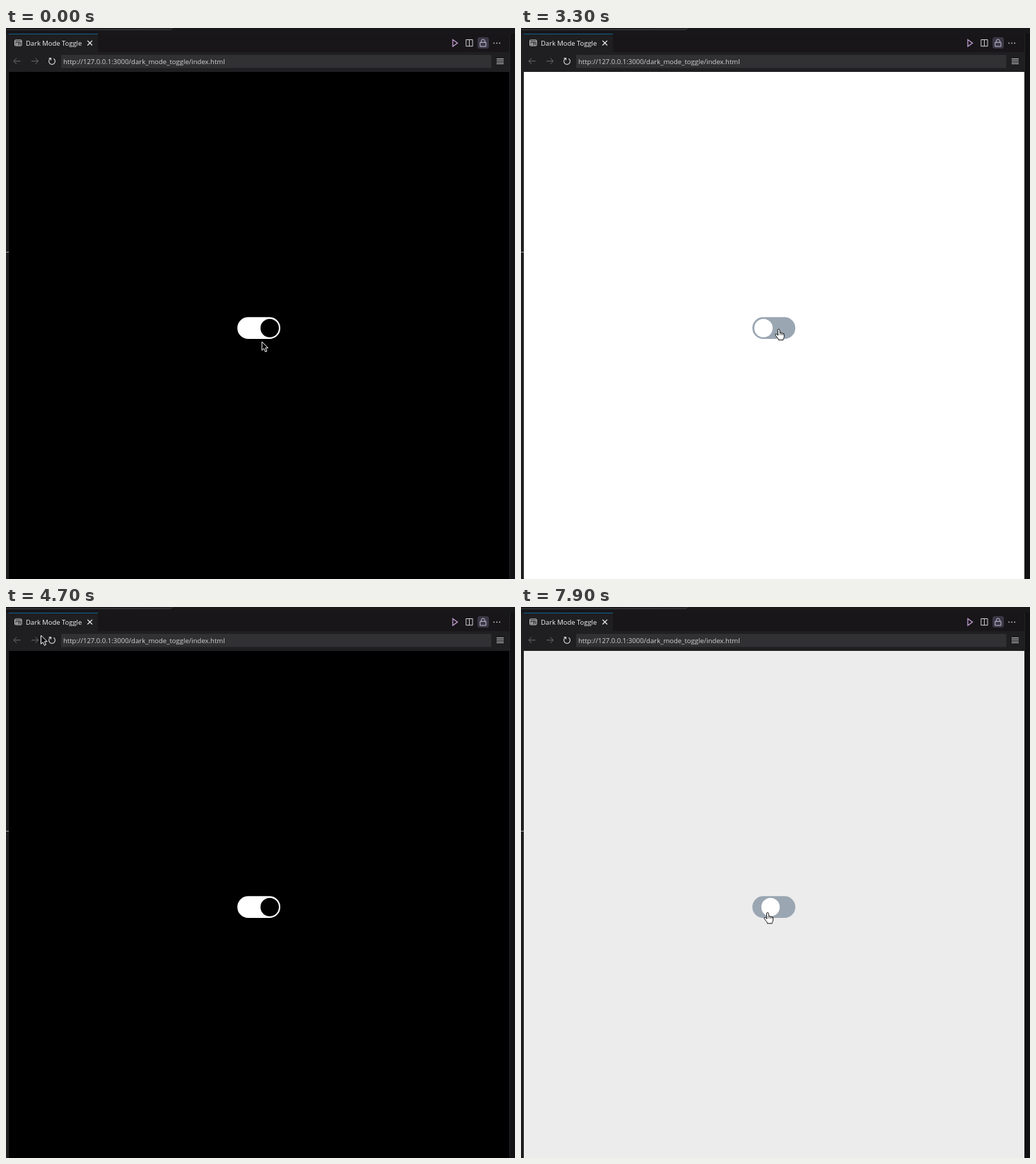
These frames come from a looping animation (720 by 778 pixels, 8000 ms). An HTML page:

```html
<!DOCTYPE html>
<html lang="en">
<head>
<meta charset="utf-8">
<title>Dark Mode Toggle</title>
<style>
  html, body { margin: 0; width: 100%; height: 100%; overflow: hidden; background: #1f1e20; }
  svg { display: block; width: 720px; height: 778px; }
  text { font-family: "Open Sans", "Noto Sans", sans-serif; }
  .line { fill: none; stroke: #d0cfd1; stroke-width: 1; }
  .dim { stroke: #6c6a6e; }
</style>
</head>
<body>
<svg viewBox="0 0 720 778">
  <!-- window frame -->
  <rect width="720" height="778" fill="#1f1e20"/>
  <rect width="720" height="8" fill="#18171a"/>
  <path d="M0 2.5H232Q235 2.5 235 0" fill="#222124" stroke="#3c3b3e"/>
  <rect x="4" y="8" width="708" height="26" fill="#181619"/>
  <rect x="712" y="8" width="8" height="770" fill="#121114"/>
  <path d="M712.5 8V778" stroke="#232225"/>
  <path d="M0 316.5H4" stroke="#a0a0a0"/>

  <!-- tab -->
  <rect x="4" y="8" width="126" height="26" fill="#1f1e20"/>
  <path d="M4 8.5H130" stroke="#0d6290"/>
  <g class="line">
    <rect x="12.5" y="17" width="9.5" height="8" rx="1"/>
    <path d="M12.5 19.2H22M14 21.5H17V23.5H14ZM18.5 21.5H20.5M18.5 23.5H20.5"/>
  </g>
  <text x="28" y="24.7" font-size="9.43" fill="#f4f4f4">Dark Mode Toggle</text>
  <path class="line" d="M115.3 17.8L122 24.5M122 17.8L115.3 24.5" style="stroke:#eee;stroke-width:1.2"/>

  <!-- tab actions -->
  <path class="line" d="M632 16.5L638.7 21.3L632 26Z" style="stroke:#c9a3d8;stroke-width:1.2"/>
  <path class="line" d="M650.8 16.5H660V25.7H650.8ZM655.4 16.5V25.7"/>
  <rect x="667" y="13" width="16" height="16" rx="3" fill="#3b3745"/>
  <path class="line" d="M670.7 20.3H678.9V26H670.7ZM672.3 20V18.5Q672.5 16 674.8 16T677.3 18.5V20" style="stroke:#c4bdd6"/>
  <g fill="#d0cfd1"><circle cx="690.3" cy="21.3" r=".9"/><circle cx="694.3" cy="21.3" r=".9"/><circle cx="698.3" cy="21.3" r=".9"/></g>

  <!-- navigation bar -->
  <path class="line dim" d="M20.5 46.8H11M15 42.5L10.8 46.8L15 51"/>
  <path class="line dim" d="M36 46.8H45.5M41.5 42.5L45.7 46.8L41.5 51"/>
  <rect id="hover" x="57" y="38.5" width="17" height="17.5" rx="3" fill="#363538"/>
  <path class="line" d="M62.7 43.2A4.4 4.4 0 1 0 67.4 43.2M60.7 42.6H63.6V45.5" style="stroke-width:1.2"/>
  <rect x="78" y="38" width="608.5" height="18.5" fill="#313033"/>
  <text x="81" y="51.2" font-size="9.54" fill="#d2d1d3">http://127.0.0.1:3000/dark_mode_toggle/index.html</text>
  <path class="line" d="M694 43.5H704M694 45.8H704M694 48.2H704M694 50.5H704" style="stroke-width:.9"/>

  <!-- page -->
  <rect id="page" x="4" y="62" width="708" height="716"/>
  <rect id="track" x="327.3" y="408.3" width="60.7" height="30.7" rx="15.35"/>
  <circle id="thumb" cy="423.8" r="13"/>

  <!-- pointer -->
  <g id="arrow">
    <path d="M0 0V12.2L2.8 9.6L4.9 14.2L7 13.2L5 8.8H8.7Z" fill="#000" stroke="#fff" stroke-width="1" stroke-linejoin="round"/>
  </g>
  <g id="hand">
    <path d="M-1.6 1.2Q-1.5 -.4 -.3 -.4Q1 -.4 1.2 1.2L1.7 5Q3 4.2 3.9 5.4Q5.3 4.7 6 6Q7.6 5.6 7.7 7.3L7.5 11Q7.2 13 6.3 13.5V15H-.6V13.4Q-2.2 12 -3.2 10.3L-5 7.9Q-5.2 6.3 -3.5 6.6L-.9 8.4Z"
      fill="#fff" stroke="#000" stroke-width=".9" stroke-linejoin="round"/>
    <path d="M1.7 5V8M3.9 5.4V8.2M6 6V8.4" stroke="#000" stroke-width=".7"/>
  </g>
</svg>
<script>
const LOOP = 8000, STEP = 100, FADE = 400;
const OFF_X = 343, ON_X = 373;
const el = id => document.getElementById(id);
const [page, track, thumb, arrow, hand, hover] =
  ['page', 'track', 'thumb', 'arrow', 'hand', 'hover'].map(el);

// click time, dark after the click
const clicks = [[-FADE, true], [1608, false], [3373, true], [7633, false]];

// time, x, y of the pointer's hot spot
const path = [
  [0, 362, 443], [300, 362, 443], [700, 364.7, 425.5], [3800, 364.7, 425.5],
  [4500, 49.5, 40], [4700, 49.5, 40], [5000, 64, 47], [6300, 65, 47],
  [6400, 67.5, 61.5], [6900, 338, 455], [7300, 349, 431.8], [LOOP, 349, 431.8]
];
const handTimes = [[500, 3800], [4900, 6400], [7200, LOOP]];
const hoverTimes = [[4900, 6400]];

const within = (spans, t) => spans.some(([a, b]) => t >= a && t <= b);
const mix = (a, b, k) => a + (b - a) * k;
const smooth = k => k * k * (3 - 2 * k);
const show = (node, on) => node.setAttribute('visibility', on ? 'visible' : 'hidden');

// cubic-bezier(.25, .1, .25, 1)
function ease(x) {
  let lo = 0, hi = 1;
  const curve = (u, a, b) => 3 * a * u * (1 - u) ** 2 + 3 * b * u * u * (1 - u) + u ** 3;
  for (let i = 0; i < 24; i++) {
    const mid = (lo + hi) / 2;
    if (curve(mid, .25, .25) < x) lo = mid; else hi = mid;
  }
  return curve(lo, .1, 1);
}

function pointerAt(t) {
  const i = path.findIndex((p, n) => n > 0 && t <= p[0]);
  const [t0, x0, y0] = path[i - 1], [t1, x1, y1] = path[i];
  const k = smooth((t - t0) / (t1 - t0));
  return [mix(x0, x1, k), mix(y0, y1, k)];
}

function draw(t) {
  const [start, dark] = clicks.filter(c => c[0] <= t).pop();
  const k = Math.min(1, (t - start) / FADE);
  const light = Math.round(255 * (dark ? 1 - ease(k) : ease(k)));
  page.setAttribute('fill', `rgb(${light},${light},${light})`);
  track.setAttribute('fill', dark ? '#fff' : '#9aa6b2');
  thumb.setAttribute('fill', dark ? '#000' : '#fff');
  thumb.setAttribute('cx', dark ? mix(OFF_X, ON_X, k) : mix(ON_X, OFF_X, k));

  const isHand = within(handTimes, t);
  const [x, y] = pointerAt(t);
  for (const node of [arrow, hand]) node.setAttribute('transform', `translate(${x} ${y})`);
  show(hand, isHand);
  show(arrow, !isHand);
  show(hover, within(hoverTimes, t));
}

const begin = performance.now();
function tick() {
  const t = (performance.now() - begin) % LOOP;
  draw(Math.floor(t / STEP) * STEP);
  requestAnimationFrame(tick);
}
tick();
</script>
</body>
</html>
```
